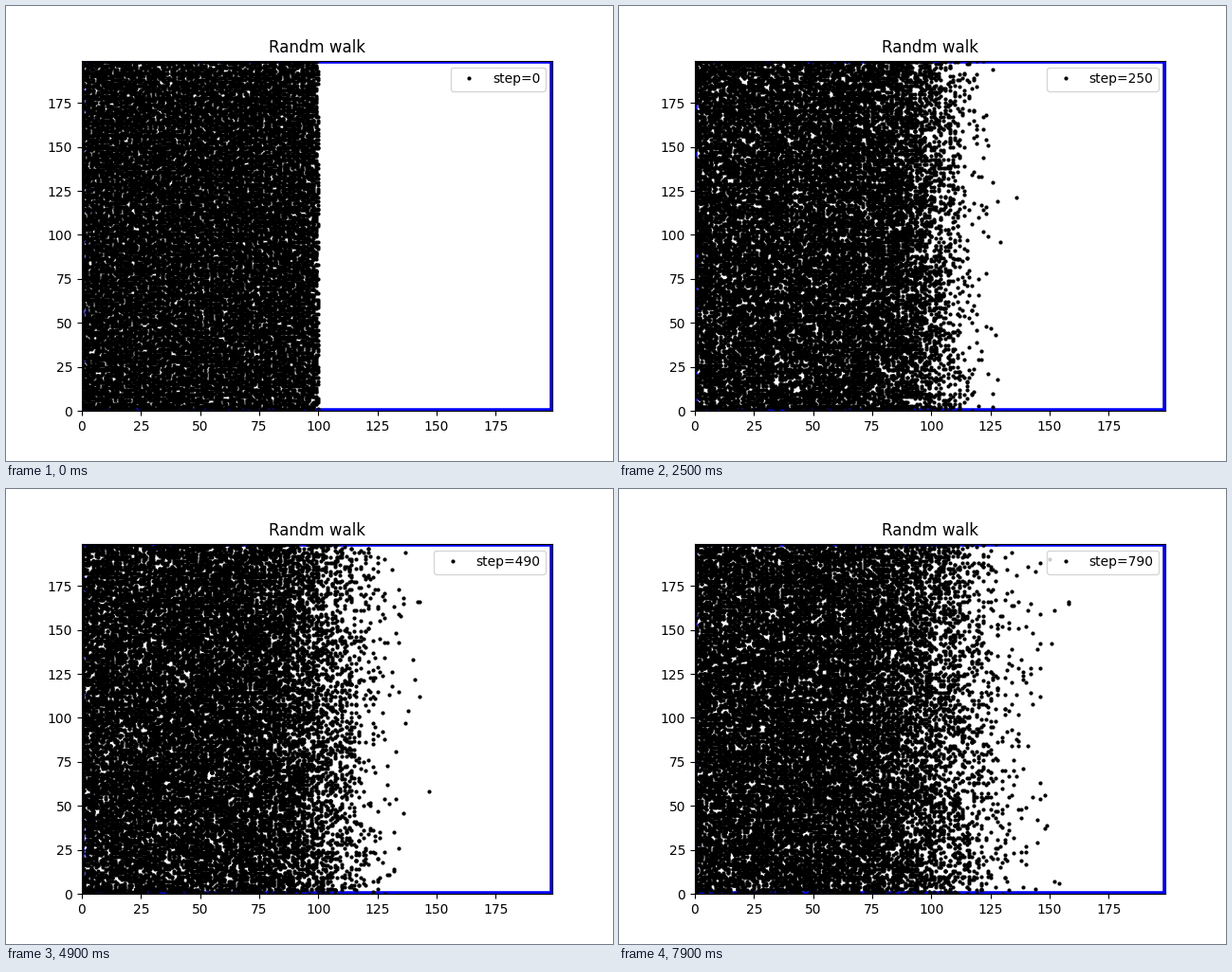
A matplotlib script for the animation above (8000 ms loop, 640 by 480 pixels).

```python
import numpy as np
import matplotlib.pyplot as plt
from matplotlib.animation import FuncAnimation

SIZE = 200          # lattice sites per side
FRAMES = 80
STEPS_PER_FRAME = 10
INTERVAL = 100      # ms

MOVES = np.array([[1, 0], [-1, 0], [0, 1], [0, -1]], dtype=np.int16)


def walk(pos, rng):
    """Move every walker one site; the walls block."""
    pos += MOVES[rng.integers(0, 4, len(pos))]
    np.clip(pos, 0, SIZE - 1, out=pos)


def simulate(seed=7):
    """Start with the left half full and record the walkers for each frame."""
    rng = np.random.default_rng(seed)
    pos = np.indices((SIZE // 2, SIZE)).reshape(2, -1).T.astype(np.int16)
    history = []
    for step in range((FRAMES - 1) * STEPS_PER_FRAME + 1):
        walk(pos, rng)
        if step % STEPS_PER_FRAME == 0:
            history.append(pos.copy())
    return history


history = simulate()

fig, ax = plt.subplots(figsize=(6.4, 4.8), dpi=100)
end = SIZE - 1
ax.plot([0, end, end, 0, 0], [0, 0, end, end, 0], color="blue", lw=4)
dots, = ax.plot([], [], "ko", ms=2, label="step=0")
ax.set(xlim=(0, end), ylim=(0, end), title="Randm walk",
       xticks=range(0, SIZE, 25), yticks=range(0, SIZE, 25))
label = ax.legend(loc="upper right").get_texts()[0]


def update(i):
    dots.set_data(history[i][:, 0], history[i][:, 1])
    label.set_text(f"step={i * STEPS_PER_FRAME}")
    return dots, label


anim = FuncAnimation(fig, update, frames=FRAMES, interval=INTERVAL,
                     repeat=True, repeat_delay=0)
plt.show()
```
